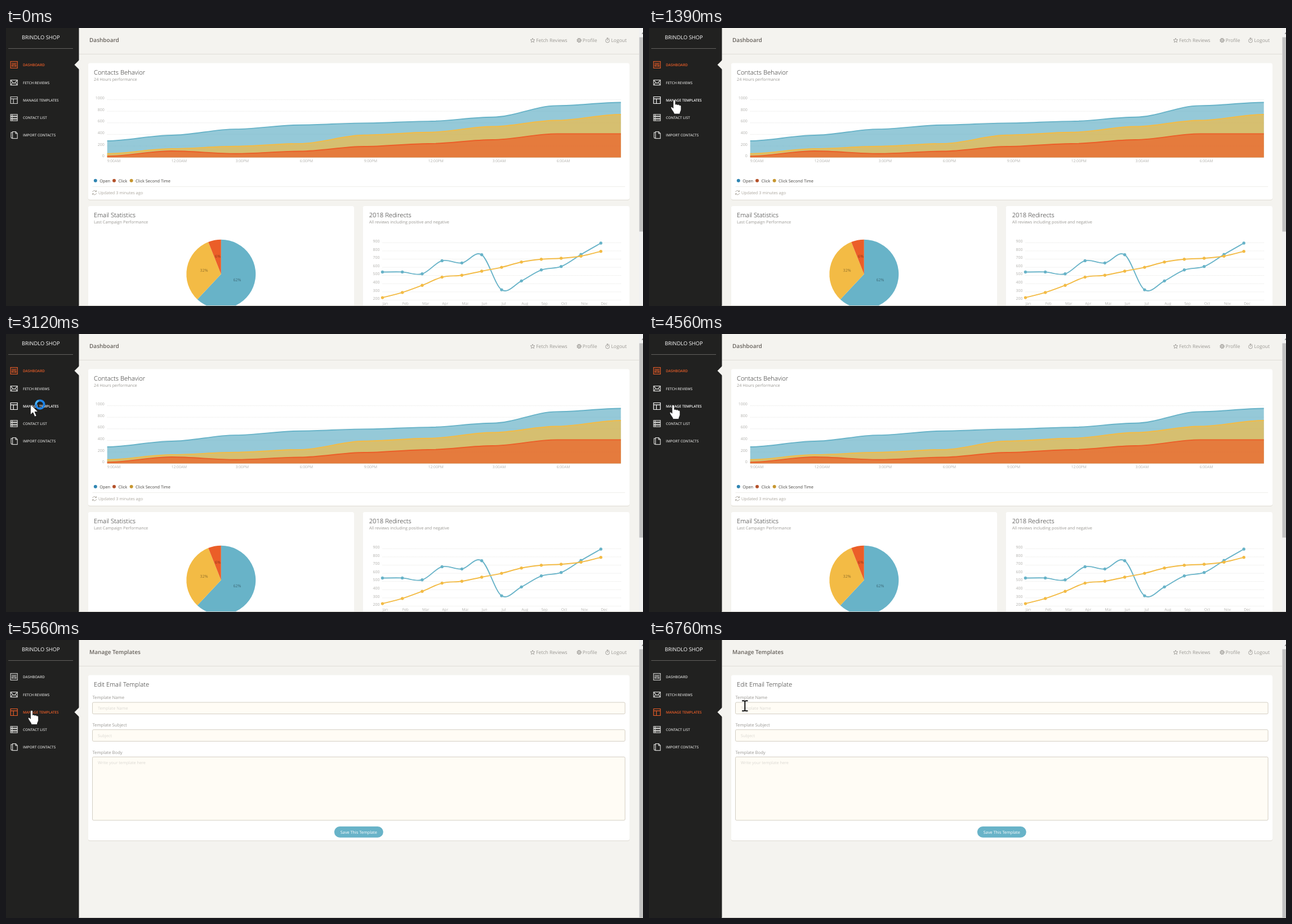
An HTML page for the animation above (8 s loop, 1131 by 495 pixels).

```html
<!DOCTYPE html>
<html lang="en">
<head>
<meta charset="utf-8">
<title>Dashboard</title>
<style>
html, body { margin: 0; width: 100%; height: 100%; overflow: hidden; background: #f4f3ef; }
svg { display: block; width: 1131px; height: 495px; }
text { font-family: "Open Sans", "Noto Sans", sans-serif; text-rendering: geometricPrecision; }
</style>
</head>
<body>
<svg id="stage" viewBox="0 0 1131 495" xmlns="http://www.w3.org/2000/svg"></svg>
<script>
const LOOP = 8000;
const BLUE = '#68b3c8', YELLOW = '#f3bb45', RED = '#eb5e28';
const BG = '#f4f3ef', NAV_TEXT = '#d2d2d0', GREY = '#9a9893', AXIS = '#b2b1ad';
const NAV = ['DASHBOARD', 'FETCH REVIEWS', 'MANAGE TEMPLATES', 'CONTACT LIST', 'IMPORT CONTACTS'];
const NAV_Y = [65.5, 97.2, 128.5, 159.5, 190.7];

const text = (x, y, size, fill, str, extra = '') =>
  `<text x="${x}" y="${y}" font-size="${size}" fill="${fill}" ${extra}>${str}</text>`;
const rect = (x, y, w, h, fill, extra = '') =>
  `<rect x="${x}" y="${y}" width="${w}" height="${h}" fill="${fill}" ${extra}/>`;
const path = (d, stroke, width, extra = '') =>
  `<path d="${d}" fill="none" stroke="${stroke}" stroke-width="${width}" ${extra}/>`;
const dot = (x, y, r, fill) => `<circle cx="${x}" cy="${y}" r="${r}" fill="${fill}"/>`;
const shift = (x, y, content) => `<g transform="translate(${x} ${y})">${content}</g>`;
const heading = (x, y, str) => text(x, y, 11.2, '#252422', str, 'font-weight="300"');
const card = (x, y, w, h) =>
  rect(x, y + 1, w, h, '#dedad2', 'rx="3.6"') + rect(x, y, w, h, '#fff', 'rx="3.6"');
const polar = (cx, cy, r, turn) =>
  [cx + r * Math.sin(turn * 2 * Math.PI), cy - r * Math.cos(turn * 2 * Math.PI)];

function gridLines(x1, x2, top, step, count, labels, labelX) {
  let out = '';
  for (let i = 0; i < count; i++) {
    const y = top + i * step;
    out += path(`M${x1} ${y}H${x2}`, '#dfdfdc', 0.7, 'stroke-dasharray="1.2 1"');
    out += text(labelX, y - 0.4, 7, AXIS, labels(i), 'text-anchor="end"');
  }
  return out;
}

// Each segment eases flat into its end points.
function areaChart() {
  const series = [
    [BLUE, [287, 385, 490, 562, 594, 626, 698, 895, 952]],
    [YELLOW, [67, 152, 193, 240, 387, 435, 535, 642, 744]],
    [RED, [23, 113, 67, 108, 190, 239, 307, 410, 410]]
  ];
  const hours = ['9:00AM', '12:00AM', '3:00PM', '6:00PM', '9:00PM', '12:00PM', '3:00AM', '6:00AM'];
  const base = 230.6, left = 179.7, step = 114;
  let out = gridLines(left, 1092, 127.6, 20.6, 6, i => 1000 - 200 * i, 174.7);
  for (const [color, values] of series) {
    const pts = values.map((v, i) => [left + i * step, base - v * 0.103]);
    const line = pts.map(([x, y], i) => i
      ? `C${x - step * 2 / 3} ${pts[i - 1][1]} ${x - step / 3} ${y} ${x} ${y}`
      : `M${x} ${y}`).join('');
    out += `<path d="${line}V${base}H${left}Z" fill="${color}" fill-opacity=".7"/>` + path(line, color, 1.9);
  }
  hours.forEach((h, i) => out += text(left + i * step, 238.7, 6.7, AXIS, h));
  return out;
}

function lineChart() {
  const series = [
    [BLUE, [542, 543, 520, 680, 653, 753, 326, 434, 568, 610, 756, 895]],
    [YELLOW, [230, 293, 380, 480, 503, 553, 600, 664, 698, 710, 736, 795]]
  ];
  const months = ['Jan', 'Feb', 'Mar', 'Apr', 'Mai', 'Jun', 'Jul', 'Aug', 'Sep', 'Oct', 'Nov', 'Dec'];
  const left = 668.4, step = 35.25;
  let out = gridLines(left, 1092, 382.3, 14.6, 8, i => 900 - 100 * i, 663.5);
  for (const [color, values] of series) {
    const pts = values.map((v, i) => [left + i * step, 484.5 - (v - 200) * 0.146]);
    const at = i => pts[Math.max(0, Math.min(pts.length - 1, i))];
    let d = `M${pts[0]}`;
    for (let i = 0; i < pts.length - 1; i++) {
      const [a, b, c, e] = [at(i - 1), at(i), at(i + 1), at(i + 2)];
      const c1 = b.map((v, k) => v + (c[k] - a[k]) / 6);
      const c2 = c.map((v, k) => v - (e[k] - b[k]) / 6);
      d += `C${c1} ${c2} ${c}`;
    }
    out += path(d, color, 1.9) + pts.map(([x, y]) => dot(x, y, 2.7, color)).join('');
  }
  months.forEach((m, i) => out += text(left + i * step, 492.8, 6.7, AXIS, m));
  return out;
}

function pieChart() {
  const cx = 381.8, cy = 438.3, r = 61.5;
  let start = 0, slices = '', labels = '';
  for (const [percent, color] of [[62, BLUE], [32, YELLOW], [6, RED]]) {
    const end = start + percent / 100;
    const [lx, ly] = polar(cx, cy, r / 2, (start + end) / 2);
    slices += `<path d="M${cx} ${cy}L${polar(cx, cy, r, start)}A${r} ${r} 0 ${+(percent > 50)} 1 ${polar(cx, cy, r, end)}Z" fill="${color}"/>`;
    labels += text(lx, ly + 1.2, 7.1, '#000', percent + '%', 'text-anchor="middle" fill-opacity=".4"');
    start = end;
  }
  return slices + labels;
}

function dashboardPage() {
  const legend = [[158.8, '#2f85b2', 'Open'], [192, '#b4512a', 'Click'], [222.6, '#c7962f', 'Click Second Time']];
  return card(145.8, 62.5, 961.2, 243.3) +
    heading(156, 83.2, 'Contacts Behavior') + text(156, 94, 7.25, GREY, '24 Hours performance') +
    areaChart() +
    legend.map(([x, c, s]) => dot(x, 271.8, 3, c) + text(x + 7.4, 274.5, 7.4, '#44423e', s)).join('') +
    path('M153.5 282.5H1099', '#efeeea', 1) +
    path('M153.6 292A3.6 3.6 0 0 1 160 291M160.4 288.8V291.5H157.8M160.6 294A3.6 3.6 0 0 1 154 295.2M153.6 297.2V294.7H156.2', '#a9a49b', 0.9) +
    text(164, 295.8, 7.25, '#a9a49b', 'Updated 3 minutes ago') +
    card(145.8, 317, 472.2, 190) + heading(156, 337.4, 'Email Statistics') +
    text(156, 348, 7.3, GREY, 'Last Campaign Performance') + pieChart() +
    card(633.5, 317, 473.5, 190) + heading(644.7, 337.4, '2018 Redirects') +
    text(644.7, 348, 7.3, GREY, 'All reviews including positive and negative') + lineChart();
}

function formPage() {
  const fields = [
    ['Template Name', 'Template Name', 111, 20.6],
    ['Template Subject', 'Subject', 159.7, 20.6],
    ['Template Body', 'Write your template here', 208.2, 112.8]
  ];
  return card(145.8, 62.5, 961.2, 294.6) + heading(156, 83.2, 'Edit Email Template') +
    fields.map(([label, hint, y, h]) =>
      text(153.4, y - 5.6, 7.7, GREY, label) +
      rect(153.5, y, 945.6, h, '#fffcf5', 'rx="2" stroke="#cfc9bd" stroke-width=".9"') +
      text(163, y + 12.8, 7.25, '#dad8d2', hint)).join('') +
    rect(582.8, 332, 87, 19.7, BLUE, 'rx="9.85"') +
    text(626.3, 344.5, 7.3, '#fff', 'Save This Template', 'text-anchor="middle"');
}

// Icons are centred on the origin.
const navIcons = [
  'M-6-6H6V6H-6ZM-3-4V4M0-4V4M3-4V4M-4.4 1.5H-1.6M-1.4-1.5H1.4M1.6 2H4.4',
  'M-6-4.5H6V4.5H-6ZM-6-4L0 1.4L6-4M-6 4.2L-1.8 0M6 4.2L1.8 0',
  'M-6-6H6V6H-6ZM-6-2.4H6M-1-2.4V6',
  'M-6-5.6H6V-2.6H-6ZM-6-1.5H6V1.5H-6ZM-6 2.6H6V5.6H-6ZM-3.2-5.6V-2.6M-3.2-1.5V1.5M-3.2 2.6V5.6',
  'M-2.6-6H3L6-3V6H-2.6ZM2.8-6V-2.8H6M-2.6-4.5H-5.2V3.5A1.3 2 0 0 0-2.6 3.5'
];
const starIcon = path([...Array(10).keys()]
  .map(i => (i ? 'L' : 'M') + polar(0, 0.2, i % 2 ? 1.8 : 4.1, i / 10)).join('') + 'Z', GREY, 0.9);
const gearIcon = `<circle r="3.4" fill="none" stroke="${GREY}" stroke-width="1.7" stroke-dasharray="1.5 1.17"/>` +
  `<circle r="2.7" fill="none" stroke="${GREY}" stroke-width=".9"/><circle r="1.1" fill="none" stroke="${GREY}" stroke-width=".8"/>`;
const timerIcon = `<circle cy=".6" r="3.4" fill="none" stroke="${GREY}" stroke-width=".9"/>` +
  path('M0 1V-1.4M0-2.8V-4.2M-1.4-4.2H1.4M2.6-2.6L3.5-3.4', GREY, 0.9);

function header(title, bare) {
  const links = [['Fetch Reviews', 941.2, 946, 935, starIcon], ['Profile', 1023.8, 1025.6, 1017.6, gearIcon], ['Logout', 1074.4, 1074.4, 1068, timerIcon]];
  return path('M129.5 46.5H1124', '#dfddd7', 1) +
    text(148, 25.3, 10, '#66615b', title, 'font-weight="600"') +
    links.map(([label, x, bareX, iconX, icon]) =>
      text(bare ? bareX : x, 25.1, 8.55, GREY, label) + (bare ? '' : shift(iconX, 22, icon))).join('');
}

function sidebar(active, hover, bare) {
  const items = NAV.map((label, i) => {
    const color = i === active ? RED : i === hover ? '#fff' : NAV_TEXT;
    return text(30, NAV_Y[i] + 2.4, 6.35, color, label, 'font-weight="600"') +
      (bare ? '' : shift(14.2, NAV_Y[i], path(navIcons[i], color, 1.2)));
  }).join('');
  const arrow = `<path d="M130 ${NAV_Y[active] - 8.5}L121.5 ${NAV_Y[active]}L130 ${NAV_Y[active] + 8.5}Z" fill="${BG}"/>`;
  return rect(0, 0, 129.5, 495, '#212120') +
    (bare ? '' : text(61.8, 20.3, 9.4, '#fff', 'BRINDLO SHOP', 'text-anchor="middle"')) +
    shift(0, bare ? -15.6 : 0, path('M4 36.5H119', '#62615e', 1) + items + arrow);
}

const scrollbar = end => rect(1124, 0, 7, 495, '#f1f1f1') +
  rect(1124.5, 16.5, 6.5, end - 16.5, '#c1c1c1') + '<path d="M1128.5 10.5L1131 7.5V10.5Z" fill="#777"/>';

const cursors = {
  hand: '<path d="M-2 1.8C-2-.6 1.9-.6 1.9 1.8V8.2C3-0+7.4 5 7.6 5.3 8.9C6.6 7.9 8.7 8.3 8.9 9.8C10.3 9 12 9.8 12 11.5V17C12 20 10 21 9.8 25H-.3C-.8 21.4-4.4 18.6-6 14.4C-6.6 12.3-4.3 11.7-2 14.8Z" fill="#fff" stroke="#111" stroke-width=".7"/>'
    .replace('C3-0+7.4 5 7.6 5.3 8.9C6.6 7.9', 'C3 7.4 5 7.6 5.3 8.9C6.6 7.9'),
  arrow: '<path d="M0 0V18.8L4.4 14.8L7.6 22.2L10.8 20.8L7.6 13.6H13.4Z" fill="#fff" stroke="#111" stroke-width=".8"/>',
  beam: path('M-5.2-9H-1.6L0-8.2L1.6-9H5.2M0-8.5V8.5M-5.2 9H-1.6L0 8.2L1.6 9H5.2', '#111', 2)
};
const spinner = shift(60.4, 125.6, `<circle r="7.3" fill="none" stroke="#1d83e6" stroke-width="3.8"/>` +
  path('M-7.3 0A7.3 7.3 0 0 1-2.5-6.9', '#4fb4f5', 3));

// Index of the current step among `count` steps from `from` to `to`.
const stepAt = (t, from, to, count) => Math.floor(Math.min(1, (t - from) / (to - from)) * (count - 1) + 1e-6);

function pointer(t) {
  if (t < 280) return null;
  if (t < 600) {
    const [x, y] = [[708, 385], [430, 297], [256, 240]][stepAt(t, 280, 450, 3)];
    return { x, y, kind: 'arrow' };
  }
  if (t < 2330) {
    const u = (stepAt(t, 600, 1390, 11) + 1) / 11, v = 1 - u;
    const bezier = (a, b, c) => a * v * v + 2 * b * u * v + c * u * u;
    const x = bezier(256, 60, 45), y = bezier(240, -145, 128);
    return { x, y, kind: x < 122 && y < 206 ? 'hand' : 'arrow' };
  }
  if (t < 2940) return { x: 43, y: 126.5, kind: 'hand' };
  if (t < 4560) return { x: 43.4, y: 125, kind: 'arrow' };
  if (t < 5560) return { x: 43, y: 126.5, kind: 'hand' };
  if (t < 6450) {
    const u = stepAt(t, 5560, 6360, 9) / 8, x = 45.5 + 100.5 * u;
    return { x, y: 125.5 - 9.3 * u, kind: x < 129 ? 'hand' : 'arrow' };
  }
  return { x: 155 + 5.1 * stepAt(t, 6450, 6760, 4), y: 117.3, kind: 'beam' };
}

const stage = document.getElementById('stage');
const pages = { dashboard: dashboardPage(), form: formPage() };
let shown = '';

function render(t) {
  const p = pointer(t);
  const onForm = t >= 4760, bare = onForm && t < 4920;
  const active = onForm ? 2 : 0;
  const hover = p && p.x < 129 ? NAV_Y.findIndex(y => Math.abs(y - p.y) < 15) : -1;
  const busy = t >= 3120 && t < 4560;
  const key = JSON.stringify([p, onForm, bare, busy]);
  if (key === shown) return;
  shown = key;
  stage.innerHTML = rect(0, 0, 1131, 495, BG) +
    shift(0, bare ? -0.7 : 0, header(onForm ? 'Manage Templates' : 'Dashboard', bare) +
      (onForm ? pages.form : pages.dashboard)) +
    sidebar(active, hover, bare) + scrollbar(onForm ? 495 : 362.5) +
    rect(129.5, 494, 1001.5, 1, '#c9c7c1') +
    (p ? shift(p.x, p.y, cursors[p.kind]) : '') + (busy ? spinner : '');
}

function tick() {
  render(performance.now() % LOOP);
  requestAnimationFrame(tick);
}
tick();
</script>
</body>
</html>
```
